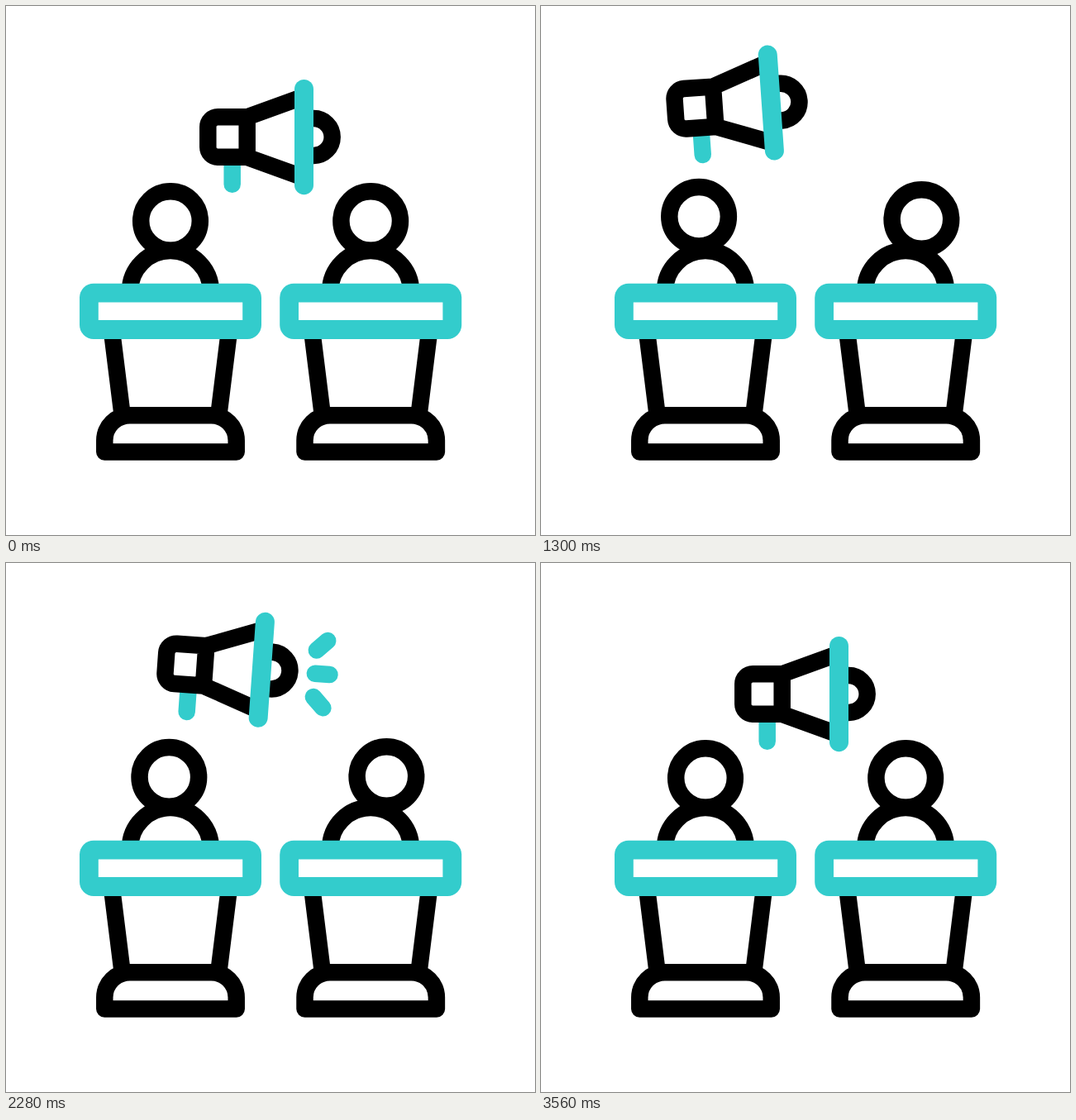
Animation of 640 by 640 pixels, one loop 3.6 s. Source, as an HTML page:

```html
<!DOCTYPE html>
<html lang="en">
<head>
<meta charset="utf-8">
<title>Debate</title>
<style>
  html, body { margin: 0; width: 100%; height: 100%; overflow: hidden; background: #fff; }
  svg { display: block; width: 100%; height: 100%; }
  .line { fill: none; stroke: #000; stroke-width: 20.5; stroke-linejoin: round; }
  .teal { stroke: #3cc; stroke-linecap: round; }
</style>
</head>
<body>
<svg viewBox="0 0 640 640">
  <defs>
    <g id="podium">
      <path class="line" d="M150 345A48.9 48.9 0 0 1 247.8 345
        M128.6 398L140.3 492M269.4 398L257.7 492
        M119.3 539.6V525.5A30.5 30.5 0 0 1 149.8 495.2H248.2A30.5 30.5 0 0 1 278.7 525.5V539.6Z"/>
      <rect x="89" y="335.8" width="220" height="67.2" rx="17" fill="#3cc"/>
      <rect x="111.8" y="358.5" width="174.4" height="21.5" fill="#fff"/>
    </g>
    <circle id="head" class="line" cx="199" cy="260" r="35.8"/>
  </defs>
  <use href="#podium"/>
  <use href="#podium" x="242.2"/>
  <use href="#head" id="leftHead"/>
  <use href="#head" id="rightHead" x="242.2"/>
  <g id="megaphone">
    <path class="line teal" d="M273.7 186V215.7"/>
    <path class="line" d="M291.7 134.3H256.3a12 12 0 0 0 -12 12V170.8a12 12 0 0 0 12 12H291.7Z
      M360 109.6L291.7 134.3V182.8L360 207.5
      M364 136.1H372.3A22.4 22.4 0 0 1 372.3 180.9H364"/>
    <path class="line teal" style="stroke-width:23" d="M360.5 100.5V216.7"/>
    <path id="rays" class="line teal"/>
  </g>
</svg>
<script>
const $ = id => document.getElementById(id);
const FRAME = 20, FRAMES = 180;
const BEAT = 19.85; // frames per half swing
const MAX_TILT = 6.2;

const clamp = (v, lo, hi) => Math.min(hi, Math.max(lo, v));

// Smooth step that rests at 0 before u = 0 and at 1 after u = 1
function ease(u) {
  u = clamp(u, 0, 1);
  return u * u * (3 - 2 * u);
}

// Eased swing: 0 on even beats, 1 on odd beats
const swing = beat => ease(1 - Math.abs(beat % 2 - 1));

// Every 40 frames the rays grow for 10 frames, then shrink to their far ends
function rayPath(f) {
  const u = (f - 30) % 40 / 10;
  if (f >= 130 || u <= 0 || u >= 2) return "";
  return [-1, 0, 1].map(side => {
    const angle = side * Math.PI / 4;
    const point = k => [
      425.2 + 50.3 * k * Math.cos(angle),
      158.5 + 28.3 * side + 50.3 * k * Math.sin(angle)
    ];
    return `M${point(ease(u - 1))}L${point(ease(u))}`;
  }).join("");
}

const move = (id, x, y, extra = "") =>
  $(id).setAttribute("transform", `translate(${x} ${y}) ${extra}`);

function draw() {
  const f = Math.floor(performance.now() / FRAME) % FRAMES;
  const beat = clamp((f - 20) / BEAT, 0, 7);
  const enter = ease(f / 20);
  const away = enter - ease((f - 158) / 20);

  const nod = enter * (1 - swing(Math.min(beat, 5)));
  const lean = ease(f / 22) - ease(beat - 5);
  // The first and last beats go only halfway, from and to upright
  const tilt = MAX_TILT * (2 * swing(beat) - ease(beat) - ease(beat - 6));

  move("leftHead", -9.6 * nod, -6.4 * nod);
  move("rightHead", 19.2 * lean, -2 * lean);
  move("megaphone", -48.4 * away - 36.3 * nod, -35.6 * away, `rotate(${tilt} 273.5 210.5)`);
  $("rays").setAttribute("d", rayPath(f));
  requestAnimationFrame(draw);
}
draw();
</script>
</body>
</html>
```
